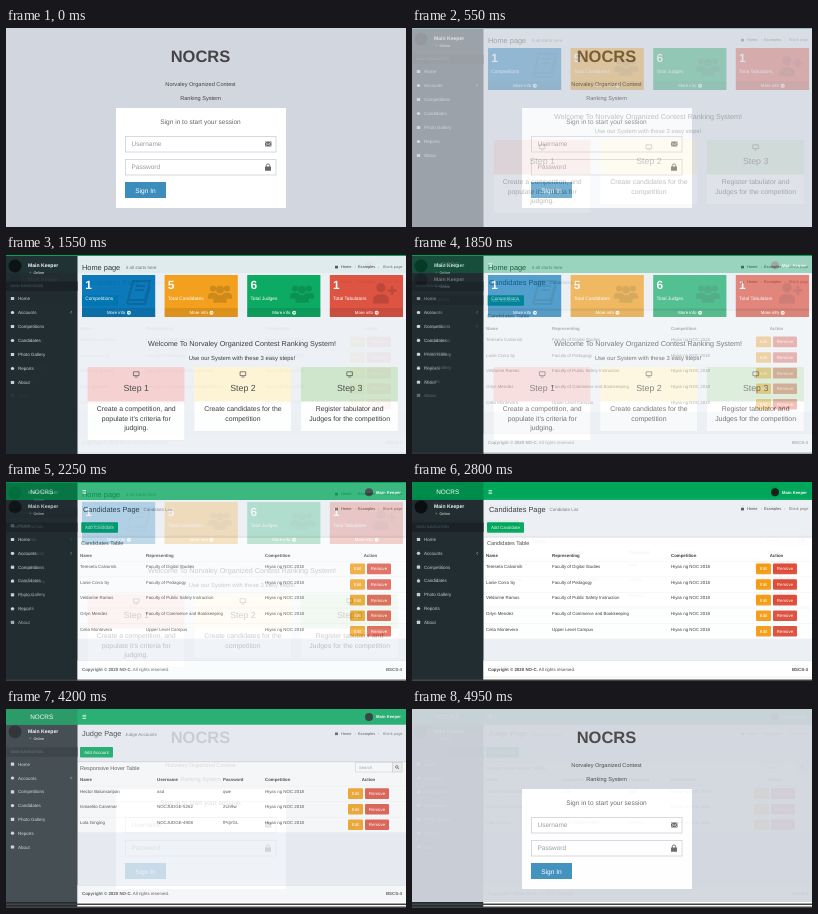
Write an HTML page that moves like this. It is 400 px wide and 199 px high and loops after 5000 ms.

```html
<!DOCTYPE html>
<html lang="en">
<head>
<meta charset="utf-8">
<title>Contest ranking tour</title>
<style>
html, body { margin: 0; width: 100%; height: 100%; overflow: hidden; background: #d2d6de; }
svg { position: absolute; inset: 0; width: 100%; height: 100%; opacity: 0; }
text { font-family: "Liberation Sans", Arial, sans-serif; text-rendering: geometricPrecision; white-space: pre; }
</style>
</head>
<body>
<script>
const STEP = 50, HOLD = 300, SLIDE = 1250, FADE_STEPS = 20;
const BLUE = '#0073b7', ORANGE = '#f39c12', GREEN = '#00a65a', RED = '#dd4b39';
const BRAND = 'NOCRS', USER = 'Main Keeper', EVENT = 'Hiyas ng NOC 2018';

const rect = (x, y, w, h, fill, extra = '') =>
  `<rect x="${x}" y="${y}" width="${w}" height="${h}" fill="${fill}" ${extra}/>`;
const disc = (x, y, r, fill) => `<circle cx="${x}" cy="${y}" r="${r}" fill="${fill}"/>`;
const path = (d, stroke, width = .6, fill = 'none') =>
  `<path d="${d}" stroke="${stroke}" stroke-width="${width}" fill="${fill}"/>`;
// y is the vertical middle of the line
const text = (x, y, s, size, fill = '#333', anchor = 'start', weight = 400) =>
  `<text x="${x}" y="${y + size * .35}" font-size="${size}" fill="${fill}" text-anchor="${anchor}" font-weight="${weight}">${s}</text>`;
const mid = (x, y, s, size, fill, weight) => text(x, y, s, size, fill, 'middle', weight);
const bold = (x, y, s, size, fill, anchor) => text(x, y, s, size, fill, anchor, 700);
const button = (x, y, w, h, s, fill) =>
  rect(x, y, w, h, fill, 'rx="1"') + mid(x + w / 2, y + h / 2, s, 4.4, '#fff');

function login() {
  const field = (y, s) =>
    rect(119.5, y + .5, 150.5, 15.5, '#fff', 'stroke="#ccd0d6" stroke-width=".8"') + text(125.5, y + 8, s, 6.5, '#999');
  return rect(0, 0, 400, 199, '#d2d6de') +
    mid(194.5, 28, BRAND, 16.5, '#444', 700) +
    mid(194.5, 56.5, 'Norvaley Organized Contest', 5.6, '#444') +
    mid(194.5, 70.5, 'Ranking System', 5.6, '#444') +
    rect(110, 80, 170, 100, '#fff') +
    mid(194.5, 93.8, 'Sign in to start your session', 6.55, '#666') +
    field(108, 'Username') + field(131, 'Password') +
    rect(259, 113.5, 6.5, 5, '#666') + path('M259 114l3.2 2.6l3.3-2.6M259 118.4l2.2-2M265.5 118.4l-2.2-2', '#fff', .6) +
    rect(259, 138.6, 6, 4.2, '#666', 'rx=".5"') + path('M260.3 139v-1.4a1.7 1.7 0 0 1 3.4 0v1.4', '#666', .9) +
    rect(119, 154, 41, 16, '#3c8dbc') + mid(139.5, 162.2, 'Sign In', 6.6, '#fff');
}

// y is the bottom edge of the page header
function sidebar(y, pitch = 13.8) {
  const items = ['Home', 'Accounts', 'Competitions', 'Candidates', 'Photo Gallery', 'Reports', 'About'];
  return rect(0, 0, 71.5, 199, '#222d32') +
    disc(9, y + 7, 6.5, '#0b0e10') +
    bold(22, y + 6.4, USER, 5.1, '#fff') +
    disc(24.3, y + 13.6, 1, '#3c763d') + text(27.5, y + 13.6, 'Online', 3.7, '#fff') +
    rect(0, y + 22.5, 71.5, 9.5, '#1a2226') + text(4.5, y + 27.2, 'MAIN NAVIGATION', 3.7, '#4b646f') +
    items.map((s, i) => {
      const m = y + 39.5 + i * pitch;
      return rect(4.8, m - 1.6, 3.4, 3.2, '#cbd7dd', `rx="${i % 2 ? 1.6 : .5}"`) + text(12, m, s, 4.5, '#cbd7dd');
    }).join('') +
    path(`M65.8 ${y + 52}l-1.3 1.3l1.3 1.3`, '#b8c7ce');
}

function heading(x, y, title, subX, sub) {
  return text(x, y, title, 7.4) + text(subX, y + .6, sub, 4.5, '#777') +
    rect(329, y - 1.2, 3, 2.6, '#555') + text(335, y, 'Home', 3.9, '#444') +
    text(348.5, y, '›', 4, '#aaa') + text(352, y, 'Examples', 3.9, '#444') +
    text(372, y, '›', 4, '#aaa') + text(377, y, 'Blank page', 3.9, '#777');
}

function person(x, y, s) {
  return disc(x, y - 4 * s, 3.6 * s, '#000') +
    `<path d="M${x - 6 * s} ${y + 8 * s}v${-3 * s}q0 ${-4 * s} ${6 * s} ${-4 * s}t${6 * s} ${4 * s}v${3 * s}z"/>`;
}

function home() {
  const crowd = x => person(x - 7, 37, .85) + person(x + 7, 37, .85) + person(x, 39, 1.1);
  const icons = [
    path('M127 26h17l-5 19h-17zM122 45q-2 4 2 4h15l5-18M130 31h9M129 35h9', '#000', 2),
    crowd(214), crowd(296),
    person(375, 38, 1.3) + path('M386 31v9M381.5 35.5h9', '#000', 2.4)
  ];
  const box = ([n, label, fill], i) => {
    const x = 76 + i * 82.6, c = x + 36.6;
    return rect(x, 20, 73.2, 42, fill, 'rx=".6"') +
      `<g opacity=".15">${icons[i]}</g>` +
      rect(x, 53, 73.2, 9, '#000', 'opacity=".1"') +
      bold(x + 3.2, 30, n, 11.9, '#fff') + text(x + 3.2, 43.8, label, 4.8, '#fff') +
      mid(c - 2.5, 57.7, 'More info', 4.4, '#fff') + disc(c + 10.3, 57.7, 2, '#fff') +
      path(`M${c + 9} 57.7h2.4m-1-1l1 1l-1 1`, fill, .6);
  };
  const card = ([fill, ...lines], i) => {
    const x = 81.5 + i * 106.7, c = x + 48.7, h = 46.5 + lines.length * 9;
    return rect(x, 112.5, 97, h, '#d8dce2') + rect(x, 112, 97, h, '#fff') + rect(x, 112, 97, 34.5, fill) +
      path(`M${c - 2.8} 116.8h5.6v3.8h-5.6zM${c - 1.5} 122h3`, '#444', .7) +
      mid(c, 132.8, 'Step ' + (i + 1), 8.8, '#444') +
      lines.map((s, k) => mid(c, 153.8 + k * 9.5, s, 6.9, '#333')).join('');
  };
  return rect(0, 0, 400, 199, '#ecf0f5') + sidebar(4, 14) + rect(0, 0, 400, 1, GREEN) +
    heading(76, 12, 'Home page', 120, 'it all starts here') +
    [['1', 'Competitions', BLUE], ['5', 'Total Candidates', ORANGE],
     ['6', 'Total Judges', GREEN], ['1', 'Total Tabulators', RED]].map(box).join('') +
    mid(236, 88, 'Welcome To Norvaley Organized Contest Ranking System!', 7.2) +
    mid(236, 103.2, 'Use our System with these 3 easy steps!', 5.9) +
    [['#f5cfcf', 'Create a competition, and', "populate it's criteria for", 'judging.'],
     ['#fdf3d3', 'Create candidates for the', 'competition'],
     ['#cde5cb', 'Register tabulator and', 'Judges for the competition']].map(card).join('');
}

function tablePage({ y, x, title, subX, sub, add, addW, caption, cols, rows, editX, search, rules }) {
  let s = rect(0, 0, 400, 199, '#ecf0f5') + sidebar(y) +
    rect(0, 0, 400, y, GREEN) + rect(0, 0, 71.5, y, '#008d4c') +
    mid(35.7, y - 7.8, BRAND, 6.4, '#fff') +
    [-1.6, 0, 1.6].map(d => rect(76.5, y - 8.2 + d, 3.6, .7, '#fff')).join('') +
    disc(363, y - 7.8, 4, '#14211b') + bold(370, y - 7.8, USER, 4.2, '#fff') +
    heading(x + 2, y + 9, title, subX, sub) +
    button(x, y + 22.2, addW, 10.6, add, GREEN) +
    rect(72, y + 36.5, 328, 71 + (rows.length - 3) * 15.6, '#fff') + rect(72, y + 36.5, 328, 1, '#d2d6de') +
    text(x, y + 43, caption, 5.5, '#444');
  if (search) s +=
    rect(349.5, 53.5, 37, 9.5, '#fff', 'stroke="#d2d6de" stroke-width=".7"') + text(353, 58.3, 'Search', 4.2, '#999') +
    rect(386.5, 53.5, 9.5, 9.5, '#f4f4f4', 'stroke="#ccc" stroke-width=".7"') +
    path('M392.1 57.9a1.3 1.3 0 1 1-2.6 0a1.3 1.3 0 1 1 2.6 0m-.4.9l1.4 1.4', '#444', .7);
  s += cols.map(([cx, name]) => bold(cx, y + 55.2, name, 4.35)).join('') +
    mid(editX + 20.5, y + 55.2, 'Action', 4.35, '#333', 700);
  rows.forEach((row, i) => {
    const m = y + 68.8 + i * 15.6;
    s += rect(72, m - 7.8, 328, .5, '#f0f0f0') +
      [...row, EVENT].map((c, k) => text(cols[k][0], m - 2.2, c, 4.4)).join('') +
      button(editX, m - 5.2, 15, 10.6, 'Edit', ORANGE) + button(editX + 17, m - 5.2, 24, 10.6, 'Remove', RED);
  });
  return s + rect(71.5, y + 160.5, 328.5, 40, '#fff') + rect(71.5, y + 160.5, 328.5, .5, '#d2d6de') +
    `<text x="76" y="${y + 170.6}" font-size="4.4" fill="#444"><tspan font-weight="700">Copyright © 2020 NO-C.</tspan> All rights reserved.</text>` +
    bold(396, y + 169.1, 'BSCS-4', 4.4, '#444', 'end') +
    rules.map(m => rect(0, m, 400, 1.5, '#444')).join('');
}

const candidates = () => tablePage({
  y: 18, x: 75, title: 'Candidates Page', subX: 137.5, sub: 'Candidate List',
  add: 'Add Candidate', addW: 37, caption: 'Candidates Table', editX: 344, rules: [197.5],
  cols: [[74, 'Name'], [140, 'Representing'], [259, 'Competition']],
  rows: [
    ['Tereseta Calvornik', 'Faculty of Digital Studies'],
    ['Lanie Corra Sy', 'Faculty of Pedagogy'],
    ['Veldarine Ramos', 'Faculty of Public Safety Instruction'],
    ['Orlyn Mendez', 'Faculty of Commerce and Bookkeeping'],
    ['Celia Montevera', 'Upper Level Campus']
  ]
});

const judges = () => tablePage({
  y: 15.7, x: 74, title: 'Judge Page', subX: 119, sub: 'Judge Accounts',
  add: 'Add Account', addW: 33, caption: 'Responsive Hover Table', editX: 342, search: true, rules: [194.5, 197.5],
  cols: [[74, 'Name'], [151, 'Username'], [217, 'Password'], [259, 'Competition']],
  rows: [
    ['Hector Balunsaripan', 'asd', 'qwe'],
    ['Ismaelito Carvenar', 'NOCJUDGE-5262', '2Un9w'],
    ['Lota Ginging', 'NOCJUDGE-4908', 'fPqVGL']
  ]
});

document.body.innerHTML = [login, home, candidates, judges]
  .map(draw => `<svg viewBox="0 0 400 199">${draw()}</svg>`).join('');
const slides = [...document.querySelectorAll('svg')];

function frame(now) {
  const t = now % (SLIDE * slides.length);
  const current = Math.floor(t / SLIDE), next = (current + 1) % slides.length;
  const u = t % SLIDE;
  const fade = u < HOLD ? 0 : (Math.floor((u - HOLD) / STEP) + 1) / FADE_STEPS;
  slides.forEach((el, i) => {
    el.style.opacity = i === current ? 1 : i === next ? fade : 0;
    el.style.zIndex = i === next ? 1 : 0;
  });
  // the returning login leaves the bottom strip uncovered
  slides[0].style.clipPath = next === 0 ? 'inset(0 0 6px 0)' : 'none';
  requestAnimationFrame(frame);
}
frame(performance.now());
</script>
</body>
</html>
```
